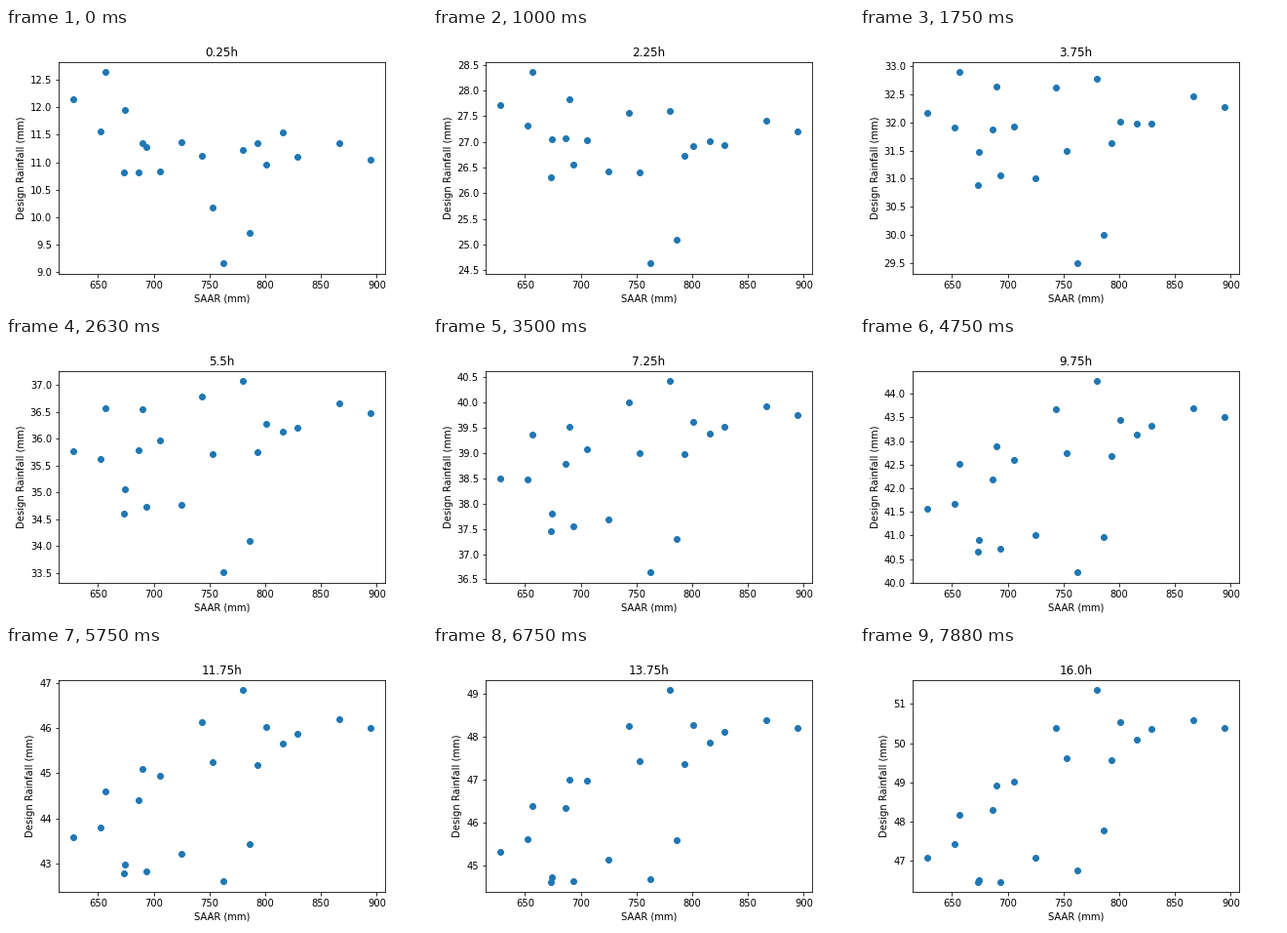
A matplotlib script that plays this animation: 432x288 px, repeating every 8 s.

```python
import numpy as np
import matplotlib.pyplot as plt
from matplotlib.animation import FuncAnimation

STEP = 0.25      # storm duration added per frame, hours
FRAMES = 64
KEY_HOURS = np.array([0.25, 5.5, 16.0])

# SAAR and the rainfall depth at each key duration
SITES = np.array([
    (628, 12.14, 35.76, 47.07), (652, 11.57, 35.63, 47.44),
    (657, 12.64, 36.56, 48.18), (673, 10.81, 34.60, 46.47),
    (674, 11.96, 35.06, 46.52), (686, 10.82, 35.79, 48.29),
    (690, 11.34, 36.54, 48.92), (693, 11.27, 34.73, 46.47),
    (706, 10.84, 35.96, 49.02), (725, 11.36, 34.77, 47.07),
    (743, 11.11, 36.78, 50.40), (753, 10.17, 35.71, 49.63),
    (762, 9.16, 33.51, 46.77), (780, 11.23, 37.07, 51.36),
    (786, 9.72, 34.09, 47.77), (793, 11.34, 35.75, 49.57),
    (801, 10.96, 36.27, 50.55), (816, 11.54, 36.13, 50.09),
    (829, 11.10, 36.21, 50.37), (866, 11.34, 36.66, 50.60),
    (894, 11.04, 36.48, 50.40),
])
saar, depths = SITES[:, 0], SITES[:, 1:]


def basis(hours):
    """Depth-duration law: ln d = a + b ln t + c / sqrt(t)."""
    t = np.atleast_1d(hours)
    return np.column_stack([np.ones_like(t), np.log(t), t ** -0.5])


coeffs = np.linalg.solve(basis(KEY_HOURS), np.log(depths).T)


def limits(values, pad):
    lo, hi = values.min() - pad, values.max() + pad
    margin = 0.05 * (hi - lo)
    return lo - margin, hi + margin


fig, ax = plt.subplots(figsize=(6, 4), dpi=72, facecolor="white")
fig.subplots_adjust(left=0.125, right=0.9, bottom=0.125, top=0.88)


def draw(i):
    hours = STEP * (i + 1)
    rain = np.exp(basis(hours) @ coeffs)[0]
    ax.clear()
    ax.scatter(saar, rain)
    ax.set_xlim(limits(saar, 0.009))
    ax.set_ylim(limits(rain, 0.0138))
    ax.set_xlabel("SAAR (mm)")
    ax.set_ylabel("Design Rainfall (mm)")
    ax.set_title(f"{hours}h")


anim = FuncAnimation(fig, draw, frames=FRAMES, init_func=lambda: None,
                     interval=125, repeat=True, repeat_delay=0)
plt.show()
```
